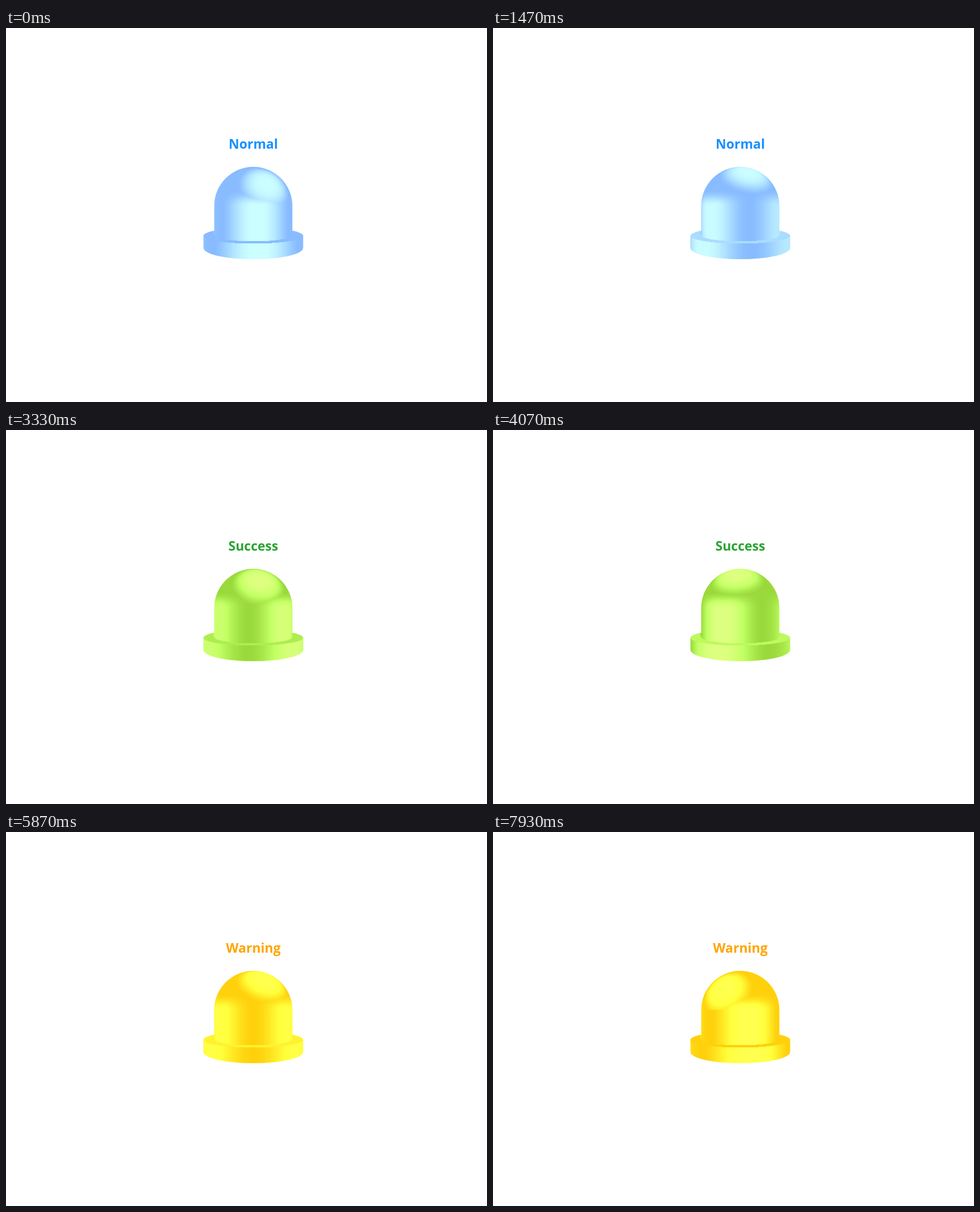
These frames come from a looping animation (849x660 px, 8000 ms). An HTML page with a canvas:

```html
<!DOCTYPE html>
<html lang="en">
<head>
<meta charset="utf-8">
<title>Signal lamp</title>
<style>
  html, body { margin: 0; width: 100%; height: 100%; overflow: hidden; background: #fff; }
  canvas { position: absolute; left: 0; top: 0; }
  #label {
    position: absolute; left: 336px; top: 188px; width: 201px;
    font: 700 23px/32px "Open Sans", "Noto Sans", sans-serif;
    text-align: center; white-space: nowrap;
  }
</style>
</head>
<body>
<canvas id="stage" width="849" height="660"></canvas>
<div id="label"></div>
<script>
const LOOP = 8000, STEPS = 120;
const states = [
  { from: 0, text: "Normal", ink: "#1890ff", base: [136, 187, 255] },
  { from: 2420, text: "Success", ink: "#2aa431", base: [154, 217, 60] },
  { from: 5420, text: "Warning", ink: "#ffa500", base: [255, 208, 12] }
];
const SHINE = 67;

// step, spin of the side lights in degrees, offset of the dome highlight in pixels
const poses = [
  [0, 6, 24, -38], [22, 72, 14, -60], [39, 141, 26, -40], [61, 213, -6, -60],
  [88, 300, 20, -54], [103, 357, -1, -30], [119, 373, -31, -38]
];

const CX = 436.5, DOME_Y = 314, DOME_R = 69, RIM_R = 88;
const BOX = { x: 346, y: 242, w: 182, h: 170 };
const stage = document.getElementById("stage").getContext("2d");
const label = document.getElementById("label");
const buffer = document.createElement("canvas");
buffer.width = BOX.w;
buffer.height = BOX.h;
const bufferCtx = buffer.getContext("2d");
const pixels = bufferCtx.createImageData(BOX.w, BOX.h);

const clamp = (v, lo = 0, hi = 1) => Math.min(hi, Math.max(lo, v));
const smooth = v => { v = clamp(v); return v * v * (3 - 2 * v); };
const wrap = deg => ((deg + 180) % 360 + 360) % 360 - 180;
const arc = (dx, radius, depth) => depth * Math.sqrt(Math.max(0, 1 - (dx / radius) ** 2));

function poseAt(step) {
  let i = 0;
  while (i < poses.length - 2 && step > poses[i + 1][0]) i++;
  const a = poses[i], b = poses[i + 1], f = (step - a[0]) / (b[0] - a[0]);
  return a.map((v, k) => v + (b[k] - v) * f);
}

// Light on an upright wall, by the horizontal direction it faces
function wallTable(spin) {
  const lights = [0, 120, 240].map(offset => {
    const angle = wrap(spin + offset);
    return { angle, power: clamp((130 - Math.abs(angle)) / 85) };
  });
  return Array.from({ length: 181 }, (_, i) => Math.max(...lights.map(({ angle, power }) =>
    power * smooth(1.12 - Math.abs(wrap(i - 90 - angle)) / 54))));
}

function makeShader([, spin, hx, hy]) {
  const wall = wallTable(spin);
  const wallLight = sine => wall[Math.round(Math.asin(clamp(sine, -1, 1)) * 180 / Math.PI) + 90];
  const spot = [hx / DOME_R, -hy / DOME_R];
  spot.push(Math.sqrt(1 - spot[0] ** 2 - spot[1] ** 2));
  const ledge = 0.5 * clamp((-hy - 42) / 12);

  return (x, y) => {
    const dx = x - CX;
    if (Math.abs(dx) <= DOME_R + 1 && y < 365.5 + arc(dx, DOME_R, 11)) {
      if (y >= DOME_Y) return wallLight(dx / DOME_R);
      const nx = dx / DOME_R, ny = (DOME_Y - y) / DOME_R;
      const nz = Math.sqrt(Math.max(0, 1 - nx * nx - ny * ny));
      const facing = nx * spot[0] + ny * spot[1] + nz * spot[2];
      const glow = smooth((facing - 0.7) / 0.31);
      const side = wallLight(nx / Math.sqrt(1 - Math.min(ny, 0.99) ** 2));
      return Math.max(glow, side * (1 - smooth(ny / 0.42)));
    }
    if (y < 366.5 + arc(dx, RIM_R, 14)) return ledge;
    return wallLight(dx / RIM_R);
  };
}

const outline = new Path2D();
outline.arc(CX, DOME_Y, DOME_R, Math.PI, 0);
outline.lineTo(CX + DOME_R, 366);
outline.lineTo(CX - DOME_R, 366);
outline.closePath();
const rim = new Path2D();
rim.ellipse(CX, 366.5, RIM_R, 14, 0, Math.PI, 0);
rim.lineTo(CX + RIM_R, 388);
rim.ellipse(CX, 388, RIM_R, 20, 0, 0, Math.PI);
rim.closePath();
outline.addPath(rim);

function draw(step) {
  const time = step * LOOP / STEPS;
  const state = states.findLast(s => time >= s.from);
  label.textContent = state.text;
  label.style.color = state.ink;

  const shade = makeShader(poseAt(step));
  for (let j = 0, p = 0; j < BOX.h; j++) {
    for (let i = 0; i < BOX.w; i++, p += 4) {
      const light = SHINE * shade(BOX.x + i + 0.5, BOX.y + j + 0.5);
      for (let c = 0; c < 3; c++) pixels.data[p + c] = state.base[c] + light;
      pixels.data[p + 3] = 255;
    }
  }
  bufferCtx.putImageData(pixels, 0, 0);
  stage.clearRect(0, 0, 849, 660);
  stage.save();
  stage.clip(outline);
  stage.drawImage(buffer, BOX.x, BOX.y);
  stage.restore();
}

let shown = -1;
const start = performance.now();
function tick() {
  const time = (performance.now() - start) % LOOP;
  const step = Math.floor((time + 1) * STEPS / LOOP) % STEPS;
  if (step !== shown) draw(shown = step);
  requestAnimationFrame(tick);
}
tick();
</script>
</body>
</html>
```
